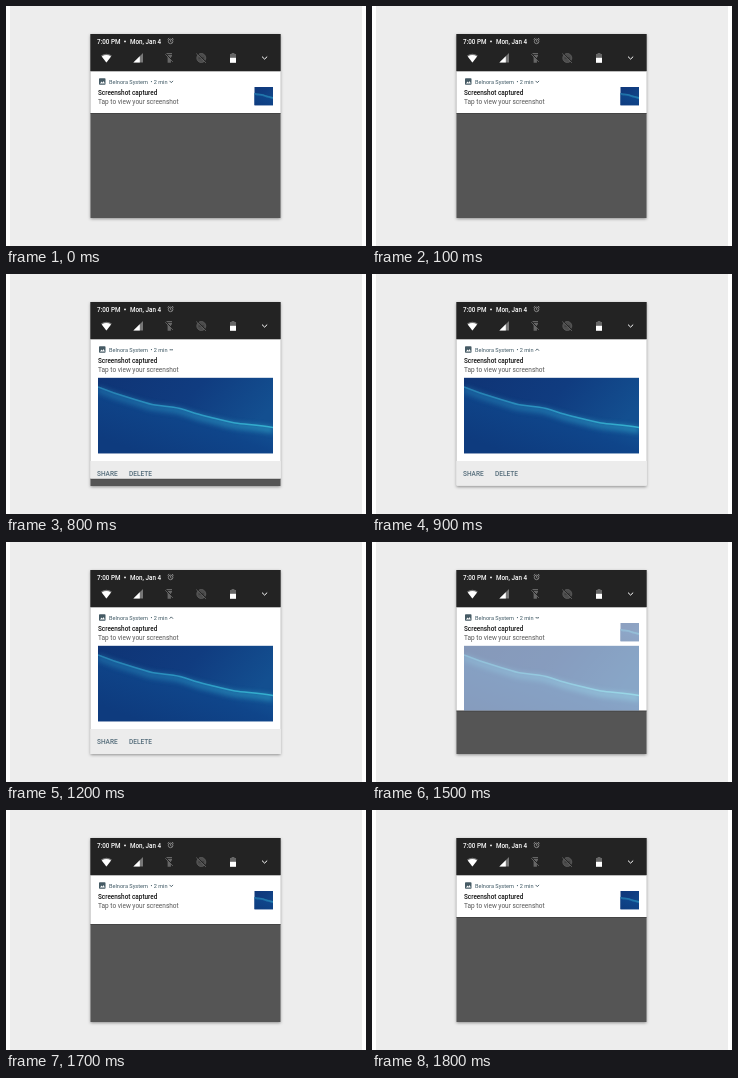
Write an HTML page that moves like this. It is 360 px wide and 240 px high and loops after 2.4 s.

```html
<!DOCTYPE html>
<html lang="en">
<head>
<meta charset="utf-8">
<title>Expanding notification</title>
<style>
  html, body { margin: 0; width: 100%; height: 100%; overflow: hidden; background: #fff; }
  svg { display: block; width: 360px; height: 240px; }
  text { font: 400 6.5px Roboto, Arial, sans-serif; }
  .medium { font-weight: 500; }
  .status { font-size: 6.3px; }
  .header { font-size: 5.6px; fill: #3e5864; }
  .line { fill: none; stroke-width: 1; }
  .thin { fill: none; stroke-width: 0.8; }
</style>
</head>
<body>
<svg viewBox="0 0 360 240">
  <defs>
    <linearGradient id="sky" x1="0" y1="0" x2="1" y2="0.35">
      <stop offset="0" stop-color="#0f3475"/>
      <stop offset="0.55" stop-color="#103c80"/>
      <stop offset="1" stop-color="#134f90"/>
    </linearGradient>
    <linearGradient id="sea" x1="0.95" y1="0.3" x2="0.25" y2="1">
      <stop offset="0" stop-color="#155c9d"/>
      <stop offset="0.45" stop-color="#0f458a"/>
      <stop offset="1" stop-color="#0e3b7e"/>
    </linearGradient>
    <linearGradient id="foam">
      <stop offset="0" stop-color="#2680b2"/>
      <stop offset="0.5" stop-color="#2c96c2"/>
      <stop offset="1" stop-color="#35b2d0"/>
    </linearGradient>
    <filter id="soft" x="-10%" y="-50%" width="120%" height="200%">
      <feGaussianBlur stdDeviation="2.8"/>
    </filter>
    <filter id="shadow" x="-10%" y="-10%" width="120%" height="120%">
      <feDropShadow dx="0" dy="1" stdDeviation="1.4" flood-opacity="0.4"/>
    </filter>
    <path id="crest" d="M0 9C12 14 21 17 32 20S48 25.5 57 27S73 28 82 30.5S98 36 107 38S127 43.5 137 45S162 47 175 49.5"/>
    <symbol id="picture" viewBox="0 0 175 76" preserveAspectRatio="xMidYMid slice">
      <rect width="175" height="76" fill="url(#sky)"/>
      <path d="M0 9L32 20L57 27L82 30.5L107 38L137 45L175 49.5V76H0Z" fill="url(#sea)"/>
      <g fill="none" stroke="url(#foam)">
        <use href="#crest" y="3" stroke-width="7" opacity="0.5" filter="url(#soft)"/>
        <use href="#crest" y="0.4" stroke-width="1.5"/>
      </g>
    </symbol>
    <clipPath id="cardClip"><rect id="cardWindow" x="84.3" y="65" width="190.5" height="42"/></clipPath>
  </defs>

  <rect x="4" width="352" height="240" fill="#ededed"/>
  <rect x="84.5" y="28" width="190" height="184" fill="#555" filter="url(#shadow)"/>

  <rect id="cardShadow" x="84.5" y="65" width="190" height="42" fill="#333" opacity="0.55"/>
  <g clip-path="url(#cardClip)">
    <rect x="84" y="65" width="191" height="148" fill="#fff"/>
    <rect x="93" y="72.3" width="6.5" height="6.5" rx="0.8" fill="#455a64"/>
    <path d="M94 77.6L95.6 75.5L96.6 76.7L97.6 75L98.8 77.6Z" fill="#fff"/>
    <text class="header" x="103" y="77.7">Belnora System</text>
    <text class="header" x="144.4" y="77.7">• 2 min</text>
    <path id="arrow" class="line" stroke="#52656f"/>
    <text class="medium" x="92" y="89" fill="#111" style="font-size:6.4px">Screenshot captured</text>
    <text x="92" y="98.2" fill="#585858">Tap to view your screenshot</text>
    <use id="thumb" href="#picture" x="248.5" y="81" width="18.5" height="18.5"/>
    <g id="details">
      <use href="#picture" x="92" y="103.6" width="175" height="76"/>
      <rect x="84" y="187" width="191" height="26" fill="#ececec"/>
      <g fill="#546c7a">
        <text class="medium" x="91" y="201.8">SHARE</text>
        <text class="medium" x="123" y="201.8">DELETE</text>
      </g>
    </g>
  </g>

  <rect x="84.5" y="28" width="190" height="37.3" fill="#232323"/>
  <g fill="#fff">
    <text class="medium status" x="91" y="37.6">7:00 PM</text>
    <circle cx="119" cy="35.4" r="0.9"/>
    <text class="medium status" x="124" y="37.6">Mon, Jan 4</text>
  </g>
  <g class="thin" stroke="#999">
    <circle cx="164.6" cy="35.4" r="2.3"/>
    <path d="M164.6 34V35.6L165.7 36.3M161.6 33.4L163.2 32.1M167.6 33.4L166 32.1"/>
  </g>
  <path d="M95 49.6Q100.4 46 105.8 49.6L100.4 56.4Z" fill="#777"/>
  <path d="M95.8 50.4Q100.4 47.6 105 50.4L100.4 56.4Z" fill="#fff"/>
  <path d="M137 47V56.6H127.4Z" fill="#777"/>
  <path d="M133.8 50.2V56.6H127.4Z" fill="#fff"/>
  <g fill="#666">
    <path d="M160.5 47H166V48.2H160.5ZM160.5 49H166V50L164.9 51.5V56.8H161.6V51.5Z"/>
    <path class="line" d="M159.7 47.7L167.5 55.5" stroke="#232323"/>
    <path class="thin" d="M159.2 48.2L167 56" stroke="#666"/>
    <circle cx="195.3" cy="52" r="4.5" fill="#4c4c4c" stroke="#606060" stroke-width="0.8"/>
    <path class="line" d="M192.6 52H198" stroke="#333"/>
    <path class="line" d="M190.8 47L200.6 56.5" stroke="#232323"/>
    <path class="thin" d="M190.2 47.5L200 57" stroke="#666"/>
    <path d="M224 48H225.6V47H228.4V48H230V52H224Z"/>
  </g>
  <rect x="224" y="51.8" width="6" height="5" fill="#fff"/>
  <path class="line" d="M256 50.6L258.6 53.1L261.2 50.6" stroke="#fff"/>
</svg>
<script>
const LOOP = 2400, STEP = 100;
const CLOSED = 42, OPEN = 147;
const get = id => document.getElementById(id);
const ramp = (t, from, to) => Math.min(1, Math.max(0, (t - from) / (to - from)));
const easeInOut = x => x < 0.5 ? 2 * x * x : 1 - 2 * (1 - x) ** 2;

function draw(time) {
  const t = Math.floor(time % LOOP / STEP) * STEP;
  const opening = 1 - Math.exp(-0.6 * (Math.max(0, t - 600) / 100) ** 2.13);
  const closing = easeInOut(ramp(t, 1250, 1800));
  const height = CLOSED + (OPEN - CLOSED) * opening * (1 - closing);

  get("cardWindow").setAttribute("height", height);
  get("cardShadow").setAttribute("height", Math.min(OPEN, height + 0.9));
  get("details").setAttribute("opacity", ramp(t, 600, 715) * (1 - ramp(t, 1350, 1650)));
  get("thumb").setAttribute("opacity", 1 - ramp(t, 600, 720) + ramp(t, 1400, 1610));

  const bend = 0.9 * (1 - 2 * (ramp(t, 700, 900) - ramp(t, 1350, 1600)));
  get("arrow").setAttribute("d", `M163.6 ${75.8 - bend}L165.3 ${75.8 + bend}L167 ${75.8 - bend}`);
}

const start = performance.now();
function tick() {
  draw(performance.now() - start);
  requestAnimationFrame(tick);
}
tick();
</script>
</body>
</html>
```
